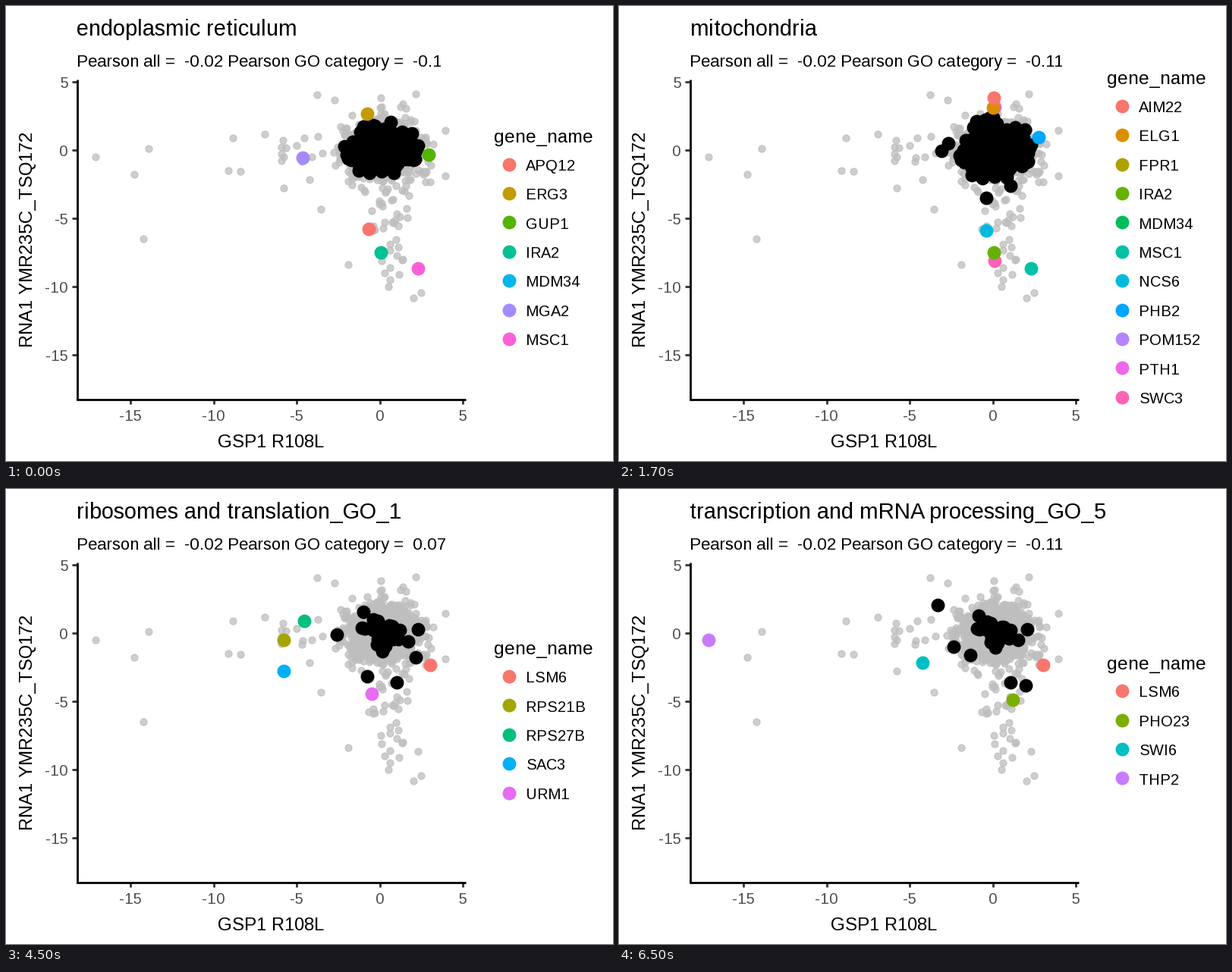
Write a matplotlib script that moves like this. It is 800 px wide and 600 px high and loops after 8000 ms.

```python
import numpy as np
import matplotlib.pyplot as plt
from matplotlib.animation import FuncAnimation

plt.rcParams["font.family"] = "Liberation Sans"
plt.rcParams["text.hinting_factor"] = 1  # whole-pixel letter advances
plt.rcParams["toolbar"] = "None"

DPI, WIDTH, HEIGHT = 160, 800, 600
LEFT, RIGHT, TOP, BOTTOM = 93.5, 606, 97, 518.5
TICK_GRAY, POINT_GRAY = "#333333", (0.745, 0.745, 0.745, 0.75)
LINE = 1.25  # points
SMALL, LARGE, STROKE = 3.95, 7.35, 0.71  # marker diameters and outline, points
CENTER = np.array([495, 189])

# Genes without a place here are covered by the dense part of the cloud.
GENES = {
    "AHC1": (496, 264), "AIM22": (494, 121), "APQ12": (478, 294),
    "DPB4": (363, 186), "ELG1": (493, 134), "ERG3": (476, 142),
    "ESC2": (553, 194), "GUP1": (557, 196), "IRA2": (494, 325),
    "LSM6": (559, 232), "MGA2": (391, 200), "MSC1": (543, 346),
    "NCS6": (484, 296), "NUP133": (293, 217), "PHB2": (553, 173),
    "PHO23": (519, 278), "PTH1": (495, 133), "RPS21B": (366, 199),
    "RPS27B": (393, 174), "SAC3": (366, 240), "SEM1": (169, 222),
    "SIF2": (529, 279), "SWC3": (495, 336), "SWI6": (400, 229),
    "THP2": (118, 199), "URM1": (482, 270), "VPS72": (517, 318),
}
FAR_POINTS = [(181, 307), (188, 188), (299, 174), (309, 218), (341, 169),
              (415, 268), (410, 117), (433, 124), (540, 116), (579, 164),
              (579, 224), (451, 341), (504, 370), (537, 385), (547, 378)]

# Black points: `count` draws inside an ellipse of size `reach`, plus strays.
SCENES = [
    dict(title="endoplasmic reticulum", corr="-0.1",
         genes="APQ12 ERG3 GUP1 IRA2 MDM34 MGA2 MSC1",
         count=190, reach=(50, 36), strays=[(446, 185), (507, 153)]),
    dict(title="mitochondria", corr="-0.11",
         genes="AIM22 ELG1 FPR1 IRA2 MDM34 MSC1 NCS6 PHB2 POM152 PTH1 SWC3",
         count=210, reach=(50, 44),
         strays=[(425, 191), (434, 181), (484, 253), (489, 147), (516, 237)]),
    dict(title="chromatin organization_GO_2", corr="0.01",
         genes="AHC1 DPB4 ESC2 NUP133 PHO23 SEM1 SIF2 SWC3 VPS72",
         count=38, reach=(45, 36),
         strays=[(442, 206), (462, 241), (461, 259), (457, 166)]),
    dict(title="ribosomes and translation_GO_1", corr="0.07",
         genes="LSM6 RPS21B RPS27B SAC3 URM1",
         count=30, reach=(50, 32),
         strays=[(436, 192), (476, 247), (515, 255), (540, 222)]),
    dict(title="transcription and mRNA processing_GO_5", corr="-0.11",
         genes="LSM6 PHO23 SWI6 THP2",
         count=26, reach=(44, 26),
         strays=[(420, 153), (441, 208), (463, 219), (516, 255), (536, 259)]),
]


def hue_color(index, count):
    """Evenly spaced hues in polar LUV with chroma 100 and luminance 65."""
    hue, chroma, lum = np.radians(15 + 360 * index / count), 100, 65
    u = chroma * np.cos(hue) / (13 * lum) + 0.1978398
    v = chroma * np.sin(hue) / (13 * lum) + 0.4683363
    y = ((lum + 16) / 116) ** 3
    x = 9 * y * u / (4 * v)
    z = -x / 3 - 5 * y + 3 * y / v
    to_rgb = np.array([[3.240479, -1.537150, -0.498535],
                       [-0.969256, 1.875992, 0.041556],
                       [0.055648, -0.204043, 1.057311]])
    rgb = np.clip(to_rgb @ [x, y, z], 0, 1)
    return np.where(rgb > 0.00304, 1.055 * rgb ** (1 / 2.4) - 0.055, 12.92 * rgb)


def blob(rng, center, spread, reach, count):
    """Normally scattered points, kept inside an ellipse."""
    points = rng.normal(center, spread, (count, 2))
    return points[(((points - center) / reach) ** 2).sum(axis=1) < 1]


def gray_points():
    rng = np.random.default_rng(8)
    return np.vstack([
        list(GENES.values()), FAR_POINTS,
        blob(rng, CENTER, (20, 15), (62, 45), 900),
        blob(rng, CENTER + (4, 4), (29, 27), (68, 68), 300),
        rng.uniform((345, 165), (425, 220), (9, 2)),
        rng.uniform((472, 240), (530, 300), (18, 2)),
        rng.normal((512, 343), (11, 19), (10, 2)),
    ])


def black_points(scene):
    rng = np.random.default_rng(3)
    reach = np.array(scene["reach"])
    return np.vstack([scene["strays"],
                      blob(rng, CENTER, reach * 0.5, reach, scene["count"])])


fig = plt.figure(figsize=(WIDTH / DPI, HEIGHT / DPI), dpi=DPI, facecolor="white")
ax = fig.add_axes([0, 0, 1, 1])
ax.set(xlim=(0, WIDTH), ylim=(HEIGHT, 0))
ax.axis("off")


def dots(points, size, color, z):
    xs, ys = np.transpose(points)
    return ax.scatter(xs, ys, s=size ** 2, c=[color], edgecolors=[color],
                      linewidths=STROKE, zorder=z)


def label(x, y, text, size, **kw):
    return ax.text(x, y, text, fontsize=size, va="baseline", **kw)


def line(xs, ys, color, z):
    ax.plot(xs, ys, color=color, lw=LINE, solid_capstyle="butt", zorder=z)


def draw_axes():
    for value in range(-15, 6, 5):
        x, y = 492.6 + 21.9 * value, 190.3 - 18 * value
        line([x, x], [BOTTOM, BOTTOM + 6.1], TICK_GRAY, 1)
        line([LEFT - 6.1, LEFT], [y, y], TICK_GRAY, 1)
        label(x, 547, str(value), 8.8, ha="center", color="#4D4D4D")
        label(82.3, y + 7.6, str(value), 8.8, ha="right", color="#4D4D4D")
    line([LEFT, LEFT], [TOP, BOTTOM + 1], "black", 2)
    line([LEFT - 1, RIGHT], [BOTTOM, BOTTOM], "black", 2)
    label(349.2, 582, "GSP1 R108L", 11, ha="center")
    label(35.5, 307.6, "RNA1 YMR235C_TSQ172", 11, ha="center",
          rotation=90, rotation_mode="anchor")


def draw_scene(scene):
    genes = scene["genes"].split()
    count = len(genes)
    first = 323.8 - 19.2 * (count - 1)
    artists = [
        label(93, 39, scene["title"], 13.2),
        label(93, 80, f"Pearson all =  -0.02 Pearson GO category =  {scene['corr']}", 9.9),
        label(642.5, first - 28.6, "gene_name", 11),
        dots(black_points(scene), LARGE, "black", 4),
    ]
    for i, name in enumerate(genes):
        color, y = hue_color(i, count), first + 38.4 * i
        artists.append(dots([(662.7, y)], LARGE, color, 5))
        artists.append(label(685.3, y + 8.2, name, 8.8))
        if name in GENES:
            artists.append(dots([GENES[name]], LARGE, color, 6 - i / 100))
    return artists


draw_axes()
dots(gray_points(), SMALL, POINT_GRAY, 3)
layers = [draw_scene(scene) for scene in SCENES]


def update(step):
    current = (step + 3) // 4
    for i, artists in enumerate(layers):
        for artist in artists:
            artist.set_visible(i == current)
    return []


anim = FuncAnimation(fig, update, frames=16, interval=500, repeat=True,
                     repeat_delay=0, blit=False)
plt.show()
```
